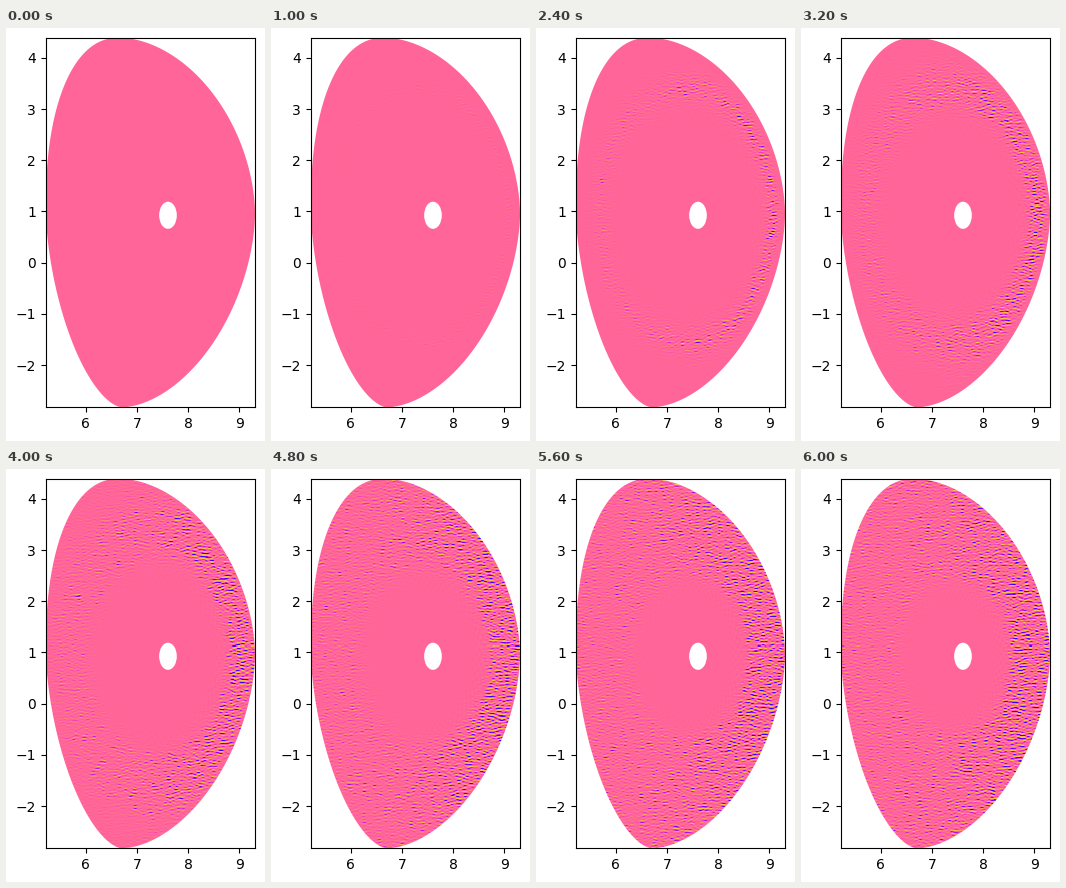
A matplotlib script for the animation above (6200 ms loop, 259x413 px).

```python
import numpy as np
import matplotlib.pyplot as plt
from matplotlib.animation import FuncAnimation
from matplotlib.patches import Ellipse, Polygon

W, H, DPI = 259, 413, 100
FRAMES, STEP = 31, 200
BOX = (39.72, 33.72, 209.3, 369.6)        # axes left, bottom, width, height
UNIT = 51.2                               # pixels per data unit
X0, Z0 = 5.219, -2.825
X1, Z1 = X0 + BOX[2] / UNIT, Z0 + BOX[3] / UNIT
AXIS = (7.607, 0.925)
REST = 0.62                               # pink of the colour map


def quadrant(side, tip, power, n=120):
    """Rounded arc from a side point to a top or bottom point."""
    t = np.linspace(0, np.pi / 2, n, endpoint=False)
    x = tip[0] + (side[0] - tip[0]) * np.cos(t) ** (2 / power)
    z = side[1] + (tip[1] - side[1]) * np.sin(t) ** (2 / power)
    return np.column_stack([x, z])


def outline():
    right, left = (X1, 0.95), (X0, 1.05)
    top, low = (6.66, Z1), (6.71, Z0)
    return np.vstack([
        quadrant(right, top, 1.84),
        [top], quadrant(left, top, 2.25)[::-1],
        quadrant(left, low, 1.68),
        [low], quadrant(right, low, 1.77)[::-1],
    ])


edge = outline()

# Data coordinates of whole screen pixels around the axes box
cols, rows = np.arange(39, 251), np.arange(9, 381)
NX, NY = len(cols), len(rows)


def to_x(px):
    return X0 + (px - BOX[0]) / UNIT


def to_z(py):
    return Z0 + (H - BOX[1] - py) / UNIT


extent = (to_x(cols[0]), to_x(cols[-1] + 1), to_z(rows[-1] + 1), to_z(rows[0]))
dx, dz = np.meshgrid(to_x(cols + 0.5) - AXIS[0], to_z(rows + 0.5) - AXIS[1])

# Flux label s: rounder surfaces inside, the outline shape at s = 1
ex, ez = (edge - AXIS).T
angle = np.arctan2(ez, ex)
order = np.argsort(angle)
reach = np.interp(np.arctan2(dz, dx), angle[order], np.hypot(ex, ez)[order],
                  period=2 * np.pi)
outer = np.hypot(dx, dz) / reach
inner = np.hypot((dx + 0.15) / 1.75, dz / 2.38)
mix = np.clip(outer, 0, 1) ** 2
s = mix * outer + (1 - mix) * inner
theta = np.arctan2(dz / 1.75, dx)
weight = 0.25 + 0.75 * ((1 + np.cos(theta)) / 2) ** 1.2

# The unstable band starts near the edge and spreads both ways
start = 9 + np.where(s < 0.88, 73 * (0.88 - s), 110 * (s - 0.88))

# Band-limited noise: short dashes, thin in the vertical direction
rng = np.random.default_rng(7)
ky = np.fft.fftfreq(NY)[:, None]
kx = np.fft.fftfreq(NX)[None, :]
band = np.exp(-((np.abs(ky) - 0.3) / 0.12) ** 2 - (kx / 0.18) ** 2)
spectrum = band * np.exp(2j * np.pi * rng.random((NY, NX)))
omega = 0.6 * np.sign(ky) + 0.4 * rng.standard_normal((NY, NX))


def field(i):
    n = max(i, 1)
    noise = np.fft.ifft2(spectrum * np.exp(1j * omega * n)).real
    noise /= noise.std()
    noise *= np.sqrt(np.abs(noise))
    grown = 1 / (1 + np.exp((start - n) / 2))
    front = np.exp(-((start - n - 7) / 5) ** 2) * (s < 0.8) * (n / FRAMES)
    ripple = 0.015 * front * np.cos(110 * s) * np.cos(48 * theta + n)
    value = REST + weight * (0.1 * grown * noise + ripple)
    return np.clip(value, 0.32, 0.8)


fig = plt.figure(figsize=((W + 1e-9) / DPI, (H + 1e-9) / DPI), dpi=DPI,
                 facecolor="white")
ax = fig.add_axes([BOX[0] / W, BOX[1] / H, BOX[2] / W, BOX[3] / H])
img = ax.imshow(field(0), cmap="gnuplot2", vmin=0, vmax=1, aspect="auto",
                extent=extent, interpolation="nearest")
img.set_clip_path(Polygon(edge, transform=ax.transData))
ax.add_patch(Ellipse(AXIS, 0.345, 0.53, facecolor="white", edgecolor="none"))
ax.set(xlim=(X0, X1), ylim=(Z0, Z1),
       xticks=range(6, 10), yticks=range(-2, 5))


def draw(i):
    img.set_data(field(i))
    return [img]


anim = FuncAnimation(fig, draw, frames=FRAMES, interval=STEP, repeat=True)
plt.show()
```
